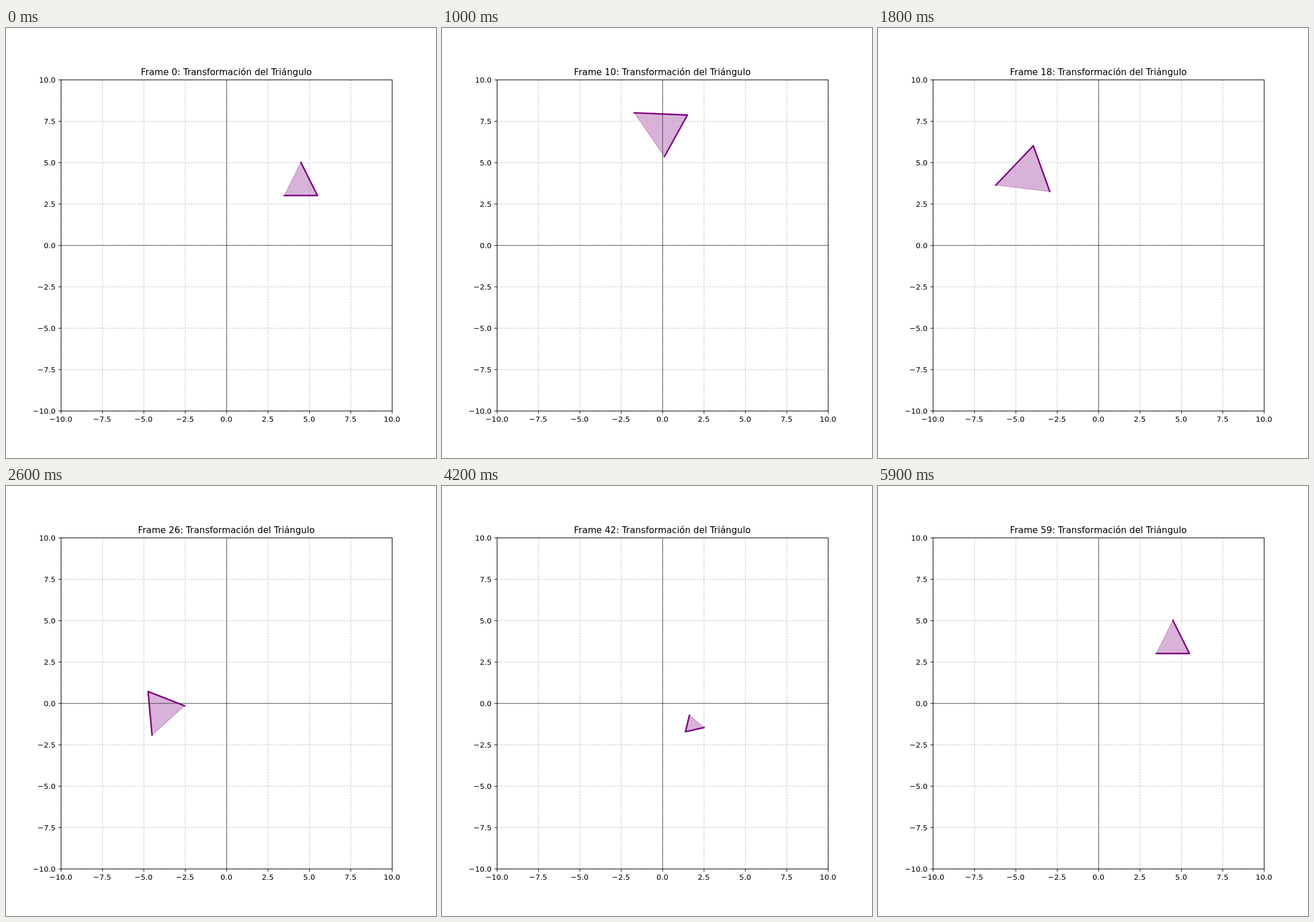
Animation, 748 px wide and 748 px high, one loop 6 s. Source, as an HTML page with a canvas:

```html
<!DOCTYPE html>
<html lang="es">
<head>
<meta charset="utf-8">
<style>
  html, body { margin: 0; width: 100%; height: 100%; overflow: hidden; background: #fff; }
  canvas { display: block; }
</style>
</head>
<body>
<canvas id="plot" width="748" height="748"></canvas>
<script>
// The chart is laid out on an 800 px figure at 100 dpi, shown at 748 px.
const FIGURE = 800, STAGE = 748;
const PT = 100 / 72;                      // pixels per point
const STEPS = 60, STEP_MS = 100;
const UNIT = 30.8, CX = 410, CY = 404;
const LEFT = 102.5, TOP = 96.5, SIZE = 616, GAP = 77;
const RIGHT = LEFT + SIZE, BOTTOM = TOP + SIZE;
const TRIANGLE = [[2, 2], [4, 2], [3, 4]];

const ctx = document.getElementById('plot').getContext('2d');
ctx.scale(STAGE / FIGURE, STAGE / FIGURE);

function line(x1, y1, x2, y2) {
  ctx.beginPath();
  ctx.moveTo(x1, y1);
  ctx.lineTo(x2, y2);
  ctx.stroke();
}

function pen(color, points, dash = []) {
  ctx.strokeStyle = color;
  ctx.lineWidth = points * PT;
  ctx.setLineDash(dash);
  ctx.lineCap = 'butt';
  ctx.lineJoin = 'miter';
}

function text(str, x, y, points, align) {
  ctx.font = `${points * PT}px "DejaVu Sans", sans-serif`;
  ctx.textAlign = align;
  ctx.fillStyle = '#000';
  ctx.fillText(str, x, y);
}

// Scale and rotate about the origin, then shift along a small circle.
function transform([x, y], angle) {
  const c = Math.cos(angle), s = Math.sin(angle), scale = 1 + 0.5 * s;
  return [
    CX + UNIT * (scale * (x * c - y * s) + 1 + 0.5 * c),
    CY - UNIT * (scale * (x * s + y * c) + 1 + 0.5 * s)
  ];
}

function trace(points) {
  ctx.beginPath();
  points.forEach(p => ctx.lineTo(...p));
}

function drawFill(points) {
  trace(points);
  ctx.closePath();
  ctx.fillStyle = 'rgba(128, 0, 128, 0.3)';
  ctx.fill();
  pen('rgba(128, 0, 128, 0.3)', 1);
  ctx.stroke();
}

function drawGrid() {
  pen('rgba(176, 176, 176, 0.7)', 0.8, [2.96 * PT, 1.28 * PT]);
  for (let d = 0; d <= SIZE; d += GAP) {
    line(LEFT + d, BOTTOM, LEFT + d, TOP);
    line(LEFT, TOP + d, RIGHT, TOP + d);
  }
  pen('#000', 0.5);
  line(LEFT, CY + 0.5, RIGHT, CY + 0.5);
  line(CX + 0.5, BOTTOM, CX + 0.5, TOP);
}

function drawOutline(points) {
  trace(points);
  pen('#800080', 2);
  ctx.lineCap = 'square';
  ctx.lineJoin = 'round';
  ctx.stroke();
}

function drawFrame() {
  pen('#000', 0.8);
  ctx.strokeRect(LEFT, TOP, SIZE, SIZE);
  for (let i = 0; i <= 8; i++) {
    const label = (i * 2.5 - 10).toFixed(1).replace('-', '\u2212');
    const x = LEFT + i * GAP, y = BOTTOM - i * GAP;
    line(x, BOTTOM, x, BOTTOM + 3.5 * PT);
    line(LEFT, y, LEFT - 3.5 * PT, y);
    text(label, x - 0.5, 733, 10, 'center');
    text(label, 92.3, y + 5.3, 10, 'right');
  }
}

function draw() {
  const step = Math.floor(performance.now() / STEP_MS) % STEPS;
  const angle = 2 * Math.PI * step / (STEPS - 1);
  const points = TRIANGLE.map(p => transform(p, angle));
  ctx.fillStyle = '#fff';
  ctx.fillRect(0, 0, FIGURE, FIGURE);
  drawFill(points);
  drawGrid();
  drawOutline(points);
  drawFrame();
  text(`Frame ${step}: Transformación del Triángulo`, CX, 88, 12, 'center');
  requestAnimationFrame(draw);
}

draw();
</script>
</body>
</html>
```
